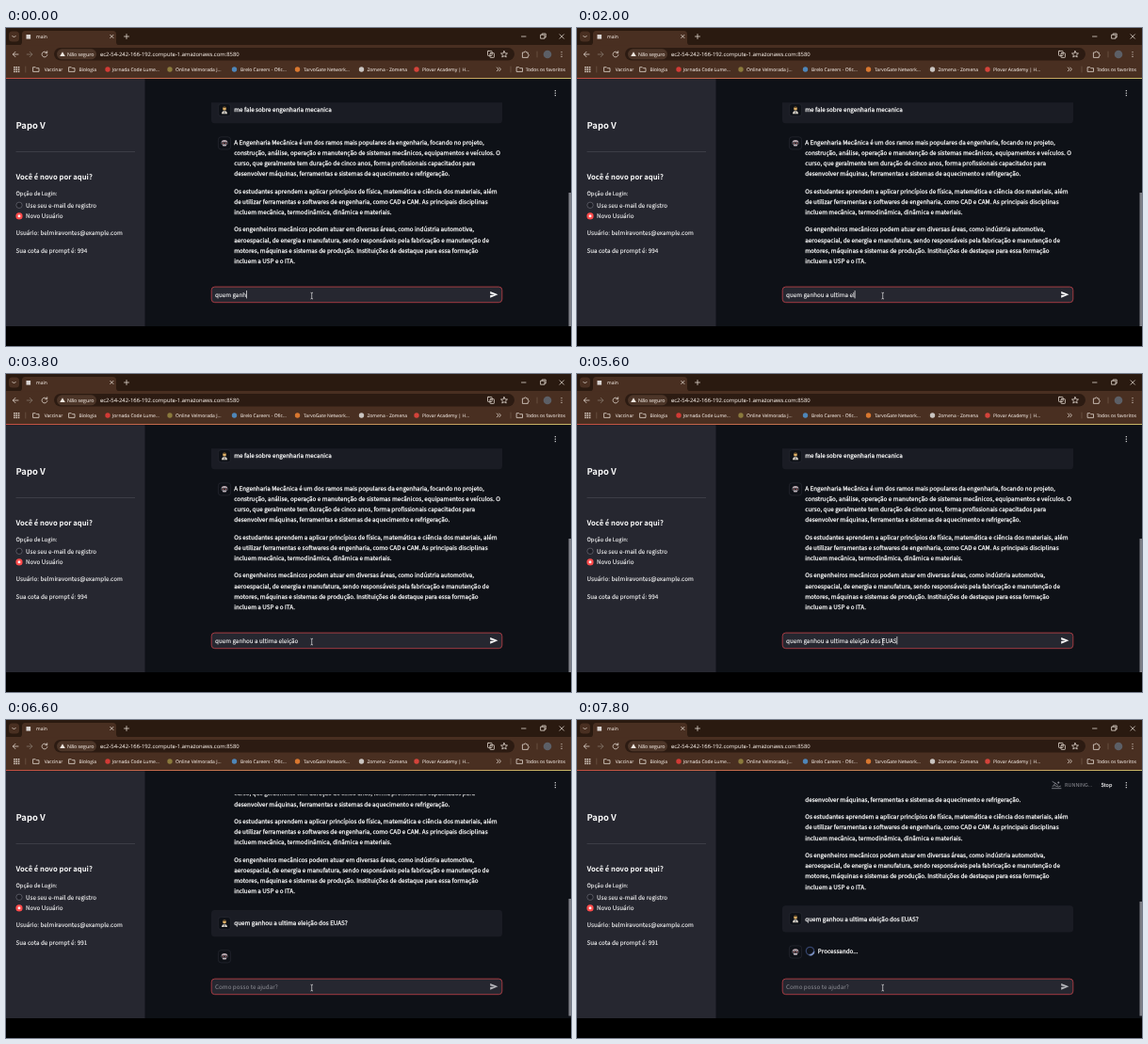
These frames come from a looping animation (600x338 px, 8000 ms). An HTML page:

```html
<!DOCTYPE html>
<html lang="pt">
<head>
<meta charset="utf-8">
<title>main</title>
<style>
html, body { margin: 0; width: 100%; height: 100%; overflow: hidden; background: #000; }
svg { display: block; width: 100%; height: 100%; }
text { white-space: pre; text-rendering: geometricPrecision; }
.page text { font: 6.29px "Noto Sans CJK JP", "Noto Sans CJK SC", "Noto Sans CJK KR", "Noto Sans CJK", "Noto Sans", sans-serif; fill: #fafafa; stroke: #fafafa; stroke-width: .1; }
.page #thread text { stroke-width: .25; }
.chrome text { font: 5px "Open Sans", "Noto Sans", sans-serif; fill: #efe6df; stroke: #efe6df; stroke-width: .06; }
.page .title { font-size: 9.4px; font-weight: 700; stroke: none; }
.page .subtitle { font-size: 7.65px; font-weight: 700; stroke: none; }
.page .label { font-size: 5.85px; }
.page .status { font-size: 5.49px; }
.page .muted { fill: #8f9097; stroke: none; }
.icon { fill: none; stroke: #e0d6cd; stroke-width: .8; stroke-linecap: round; stroke-linejoin: round; }
.spin { transform-origin: 247.5px 316px; animation: spin .75s linear infinite; }
@keyframes spin { to { transform: rotate(360deg); } }
</style>
</head>
<body>
<svg viewBox="0 0 600 338" preserveAspectRatio="none">
  <defs>
    <clipPath id="view"><rect x="148" y="79.2" width="449" height="185"/></clipPath>
    <linearGradient id="accent"><stop stop-color="#e0564a"/><stop offset="1" stop-color="#e6d878"/></linearGradient>
    <g id="user">
      <rect x="-6.6" y="-6.6" width="13.2" height="13.2" rx="3" fill="#0e1117" stroke="#31333d" stroke-width=".5"/>
      <path d="M-3 4Q-2.6 .8 0 .8T3 4Z" fill="#dcd6cb"/>
      <path d="M-.5 1H.5L.3 4H-.3Z" fill="#3b3f4c"/>
      <circle cy="-1.5" r="1.9" fill="#e0b268"/>
      <path d="M-1.9-1.7Q-1.8-4 0-4T1.9-1.7Q0-3-1.9-1.7Z" fill="#5c4527"/>
    </g>
    <g id="bot">
      <rect x="-6.6" y="-6.6" width="13.2" height="13.2" rx="3" fill="#0e1117" stroke="#31333d" stroke-width=".5"/>
      <path d="M-3.3-.6Q-3.3-3.3 0-3.3T3.3-.6V1H-3.3Z" fill="#b9a9b0"/>
      <rect x="-3" y="-1.1" width="6" height="2.2" rx="1" fill="#23262f"/>
      <path d="M-1.8 0H-.9M.9 0H1.8" stroke="#e56a62" stroke-width=".9"/>
      <path d="M-2.4 1.4H2.4L1.6 3.2H-1.6Z" fill="#c2b8c0"/>
    </g>
    <path id="folder" d="M-3-2.3H-.7L.3-1.3H3V2.4H-3Z" class="icon"/>
  </defs>

  <g class="chrome">
    <rect width="600" height="18" fill="#2a1a10"/>
    <rect y="18" width="600" height="36" fill="#492f21"/>
    <path d="M14 18.2Q17 18 17 15V6.5Q17 3 20.5 3H113.5Q117 3 117 6.5V15Q117 18 120 18.2Z" fill="#492f21"/>
    <rect x="3" y="3.5" width="11" height="11" rx="3.5" fill="#492f21"/>
    <rect x="21.5" y="7" width="4.6" height="4.6" fill="#d9d4d2"/>
    <text x="32" y="11">main</text>
    <rect x="51" y="21" width="489" height="13.5" rx="6.7" fill="#2c1b12"/>
    <rect x="54" y="22.3" width="42" height="11" rx="5.5" fill="#4c3528"/>
    <path d="M60 25.3L62.8 30H57.2Z" fill="#efe6df"/>
    <text x="65" y="29.8" style="font-size:5.3px">Não seguro</text>
    <text x="100" y="29.9" style="font-size:5.89px">ec2-54-242-166-192.compute-1.amazonaws.com:8580</text>
    <g class="icon">
      <path d="M6.8 8.3L8.5 10L10.2 8.3"/>
      <path d="M110.7 7.3L114 10.6M114 7.3L110.7 10.6M125.5 9H130.5M128 6.5V11.5"/>
      <path d="M547.5 9H552M568 7.2H572V11.2H568ZM569.2 7V6H573.2V10H572.2M588 6.8L592.4 11.2M592.4 6.8L588 11.2"/>
      <path d="M13 28H7.4M10 25.3L7.3 28L10 30.7"/>
      <path d="M22.2 28H27.8M25.2 25.3L27.9 28L25.2 30.7" stroke="#85776b"/>
      <path d="M43.4 26.3A2.9 2.9 0 1 0 43.9 28.6M43.7 24.7V26.7H41.7"/>
      <rect x="511.5" y="24.4" width="4.6" height="5" rx=".6"/>
      <rect x="514" y="26.6" width="4.4" height="4.8" rx=".6"/>
      <path d="M529 24.5L530 26.8L532.5 27L530.6 28.6L531.2 31L529 29.7L526.8 31L527.4 28.6L525.5 27L528 26.8Z"/>
      <path d="M548.8 26H550.4A1.1 1.1 0 1 1 552.6 26H554.2V27.8A1.1 1.1 0 1 1 554.2 30V31.4H548.8Z"/>
      <path d="M564 25V31" stroke="#7a6352" stroke-width=".6"/>
      <path d="M521.3 42L523 43.9L521.3 45.8M523.7 42L525.4 43.9L523.7 45.8"/>
      <path d="M20.8 41V47M536 41V47" stroke="#7a6352" stroke-width=".6"/>
    </g>
    <circle cx="575" cy="28" r="4.3" fill="#5c5f66"/>
    <g id="bookmarks"></g>
    <rect y="53.2" width="600" height="1" fill="url(#accent)"/>
  </g>

  <g class="page">
    <rect x="147" y="54.2" width="453" height="262.8" fill="#0e1117"/>
    <g clip-path="url(#view)">
      <g id="thread">
        <rect x="218" y="73" width="309" height="28.2" rx="3.5" fill="#1a1c24"/>
        <use href="#user" x="232" y="87.2"/>
        <text x="242.3" y="89.4">me fale sobre engenharia mecanica</text>
        <use href="#bot" x="232" y="122.4"/>
        <g id="answer"></g>
        <g id="question">
          <rect x="218" y="267.7" width="309" height="28.2" rx="3.5" fill="#1a1c24"/>
          <use href="#user" x="232" y="281.8"/>
          <text x="242.3" y="284">quem ganhou a ultima eleição dos EUAS?</text>
          <use href="#bot" x="232" y="317"/>
        </g>
        <g id="processing">
          <circle cx="247.5" cy="316" r="4.2" fill="none" stroke="#34436b" stroke-width="1.3"/>
          <path class="spin" d="M244.5 313A4.2 4.2 0 0 1 250.5 313" fill="none" stroke="#8ea6dc" stroke-width="1.3"/>
          <text x="255.8" y="318.6">Processando...</text>
        </g>
      </g>
    </g>
    <g id="running">
      <g fill="none" stroke="#8f9097" stroke-width=".8" stroke-linecap="round">
        <path d="M504.5 72.7H514M505 70.3Q507 68.8 509 70.3T513.5 70.3"/>
        <path id="limbs"/>
      </g>
      <circle cx="511.3" cy="66.6" r="1" fill="#8f9097"/>
      <text class="status muted" x="518" y="71.4">RUNNING...</text>
      <text class="status" x="556.5" y="71.4">Stop</text>
    </g>
    <path d="M583.3 66.7v.01M583.3 69.2v.01M583.3 71.7v.01" stroke="#fafafa" stroke-width="1.3" stroke-linecap="round"/>

    <rect x="218.2" y="275.1" width="308.6" height="16.6" rx="3.5" fill="#262730" stroke="#c4424a" stroke-width=".8"/>
    <text id="typed" x="222" y="285.7"></text>
    <rect id="caret" y="279" width=".7" height="8.4" fill="#fafafa"/>
    <path id="send" d="M514.2 279.9L522.4 283.3L514.2 286.7V284.1L519 283.3L514.2 282.5Z"/>
    <rect id="thumb" x="597.5" width="2.5" fill="#7d7f86"/>

    <rect y="54.2" width="147.5" height="262.8" fill="#262730"/>
    <text class="title" x="10.5" y="107">Papo V</text>
    <rect x="10.5" y="131" width="126.5" height=".6" fill="#4b4c55"/>
    <text class="subtitle" x="10.5" y="160.9">Você é novo por aqui?</text>
    <text class="label" x="10.5" y="177.8">Opção de Login:</text>
    <circle cx="14" cy="188.3" r="3.2" fill="#1d1e26" stroke="#777881" stroke-width=".6"/>
    <circle cx="14" cy="199.9" r="3.6" fill="#ff4b4b"/>
    <circle cx="14" cy="199.9" r="1.4" fill="#fff"/>
    <text x="21" y="190.6">Use seu e-mail de registro</text>
    <text x="21" y="202.2">Novo Usuário</text>
    <text x="10.5" y="220">Usuário: belmiravontes@example.com</text>
    <text id="quota" x="10.5" y="238.6"></text>
  </g>
  <path d="M323.5 281.2Q324.7 281.2 324.7 282.2V287Q324.7 288 323.5 288M325.9 281.2Q324.7 281.2 324.7 282.2M324.7 287Q324.7 288 325.9 288" fill="none" stroke="#fff" stroke-width=".6"/>
  <rect y="317" width="600" height="21" fill="#000"/>
</svg>
<script>
const $ = id => document.getElementById(id);
const label = (x, y, s) => `<text x="${x}" y="${y}">${s}</text>`;
const dot = (x, y, color, r = 2.7) => `<circle cx="${x}" cy="${y}" r="${r}" fill="${color}"/>`;
const folder = x => `<use href="#folder" x="${x}" y="44"/>`;

const links = [
  [108, 113, '#d23a35', 'Jornada Code Lume...'],
  [174, 180, '#8a7a3c', 'Online Velmorada J...'],
  [242.5, 249, '#4f86b8', 'Brelo Careers - Ofic...'],
  [309.5, 316, '#d9772f', 'TarvoGate Network...'],
  [377.5, 383.5, '#c9c4c0', 'Zomena - Zomena'],
  [436, 442, '#d4433a', 'Plovar Academy | H...']
];
let bar = folder(32) + label(40.7, 46, 'Vaccinar') + folder(70) + label(77.5, 46, 'Biologia')
  + folder(545.5) + label(551.7, 46, 'Todos os favoritos');
for (let i = 0; i < 9; i++)
  bar += `<rect x="${8.2 + i % 3 * 2.3}" y="${41 + Math.floor(i / 3) * 2.3}" width="1.5" height="1.5" fill="#e0d6cd"/>`;
for (const y of [25.6, 28, 30.4]) bar += dot(590, y, '#e0d6cd', .6);
for (const [iconX, textX, color, name] of links) bar += dot(iconX, 44, color) + label(textX, 46, name);
$('bookmarks').innerHTML = bar;

const paragraphs = [
  ['A Engenharia Mecânica é um dos ramos mais populares da engenharia, focando no projeto,',
   'construção, análise, operação e manutenção de sistemas mecânicos, equipamentos e veículos. O',
   'curso, que geralmente tem duração de cinco anos, forma profissionais capacitados para',
   'desenvolver máquinas, ferramentas e sistemas de aquecimento e refrigeração.'],
  ['Os estudantes aprendem a aplicar princípios de física, matemática e ciência dos materiais, além',
   'de utilizar ferramentas e softwares de engenharia, como CAD e CAM. As principais disciplinas',
   'incluem mecânica, termodinâmica, dinâmica e materiais.'],
  ['Os engenheiros mecânicos podem atuar em diversas áreas, como indústria automotiva,',
   'aeroespacial, de energia e manufatura, sendo responsáveis pela fabricação e manutenção de',
   'motores, máquinas e sistemas de produção. Instituições de destaque para essa formação',
   'incluem a USP e o ITA.']
];
let lineY = 123.5, answer = '';
for (const lines of paragraphs) {
  for (const line of lines) {
    answer += label(242.3, lineY.toFixed(1), line);
    lineY += 11.25;
  }
  lineY += 7;
}
$('answer').innerHTML = answer;

const question = 'quem ganhou a ultima eleição dos EUAS?';
// [time, visible characters]
const typing = [[0, 9], [200, 10], [400, 13], [600, 15], [800, 17], [1000, 20], [1200, 23],
  [2600, 24], [2800, 25], [3000, 26], [3200, 27], [3400, 28], [4000, 30], [4200, 32], [4400, 33],
  [4800, 34], [5000, 35], [5200, 37], [6000, 38], [6400, 0]];
const caretOff = [[1500, 1900], [3750, 4000], [6600, 8000]];
const SUBMIT = 6400, SENT = 6600, PROCESSING = 6800, RUNNING = 7000;

const show = (id, on) => $(id).setAttribute('visibility', on ? 'visible' : 'hidden');

function render(t) {
  const count = typing.filter(([at]) => t >= at).pop()[1];
  const empty = t >= SUBMIT;
  const typed = $('typed');
  typed.textContent = empty ? 'Como posso te ajudar?' : question.slice(0, count);
  typed.classList.toggle('muted', empty);
  $('caret').setAttribute('x', 222 + (empty ? 0 : typed.getComputedTextLength()));
  show('caret', !caretOff.some(([from, to]) => t >= from && t < to));
  $('send').setAttribute('fill', empty ? '#b4b5ba' : '#fafafa');

  const scroll = t < SENT ? 0 : t < PROCESSING ? 65.7 : 70.5;
  $('thread').setAttribute('transform', `translate(0 ${-scroll})`);
  const top = t < SENT ? 175 : t < PROCESSING ? 190 : 193;
  $('thumb').setAttribute('y', top);
  $('thumb').setAttribute('height', (t < SENT ? 317 : 314.5) - top);
  $('quota').textContent = 'Sua cota de prompt é: ' + (t < SENT ? 994 : 991);
  show('question', t >= SENT);
  show('processing', t >= PROCESSING);
  show('running', t >= RUNNING);
  $('limbs').setAttribute('d', Math.floor(t / 200) % 2
    ? 'M505 65.5L508 67.2L510.5 69.2M508 67.2L506.5 69'
    : 'M505.5 68.5L508 66.6L510.5 69.2M508 66.6L506 65');
}

function tick() {
  render(performance.now() % 8000);
  requestAnimationFrame(tick);
}
tick();
</script>
</body>
</html>
```
